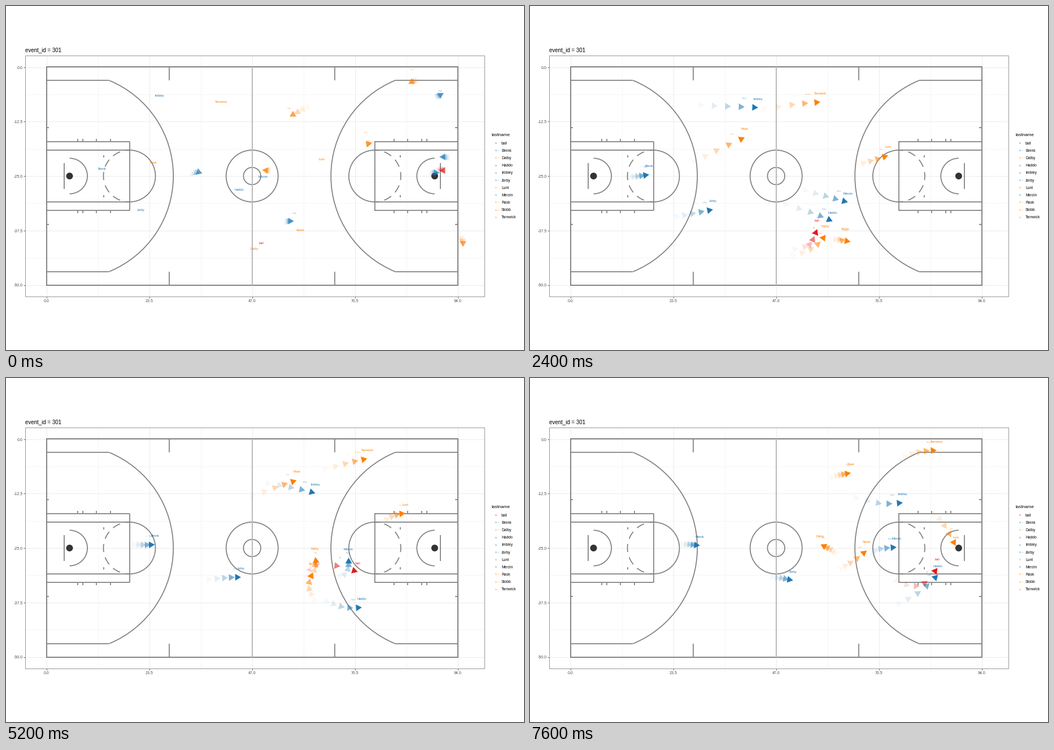
These frames come from a looping animation (917x611 px, 8 s). A matplotlib script:

```python
import numpy as np
import matplotlib.pyplot as plt
from matplotlib.animation import FuncAnimation
from matplotlib.patches import Arc, Circle, Polygon, Rectangle

W, H, DPI = 917, 611, 100
PX = 72 / DPI
FRAMES, INTERVAL = 20, 400
RED, BLUE, ORANGE = "#e31a1c", "#1f78b4", "#ff7f00"
GREY = "#7f7f7f"
WAKE_ALPHA = [1, 0.57, 0.3, 0.13, 0.04]
WAKE_SIZE = [1, 0.5, 0.25]
LABEL_RISE = 15
CX, CY = 435.7, 302

plt.rcParams["font.family"] = "Liberation Sans"
fig = plt.figure(figsize=(W / DPI, H / DPI), dpi=DPI, facecolor="white")
ax = fig.add_axes([0, 0, 1, 1])
ax.set_xlim(0, W)
ax.set_ylim(H, 0)
ax.axis("off")


def line(x0, y0, x1, y1, color=GREY, width=1.7, z=2):
    ax.plot([x0, x1], [y0, y1], color=color, lw=width * PX, zorder=z,
            solid_capstyle="butt")


def text(x, y, s, size, color="black", ha="center", va="center_baseline", **kw):
    return ax.text(x, y, s, fontsize=size * PX, color=color, ha=ha, va=va, **kw)


def arc(x, y, r, start, end):
    # Angles run clockwise on screen because y points down.
    ax.add_patch(Arc((x, y), 2 * r, 2 * r, theta1=start, theta2=end,
                     color=GREY, lw=1.7 * PX, zorder=2))


def draw_panel():
    xs = np.linspace(71.8, 799.6, 5)
    ys = np.linspace(108.5, 495.5, 5)
    for x in (xs[:-1] + xs[1:]) / 2:
        line(x, 88, x, 516, "#f0f0f0", 0.6, 0)
    for y in (ys[:-1] + ys[1:]) / 2:
        line(34, y, 847, y, "#f0f0f0", 0.6, 0)
    for i, x in enumerate(xs):
        line(x, 88, x, 516, "#ebebeb", 1, 0)
        line(x, 516, x, 519, "#555555", 0.9)
        text(x, 523.3, f"{23.5 * i:.1f}", 7, "#4d4d4d")
    for i, y in enumerate(ys):
        line(34, y, 847, y, "#ebebeb", 1, 0)
        line(31, y, 34, y, "#555555", 0.9)
        text(30, y + 0.5, f"{-12.5 * i if i else 0:.1f}", 7, "#4d4d4d", "right")
    ax.add_patch(Rectangle((34, 88), 813, 428, fill=False, ec="#8c8c8c",
                           lw=0.9 * PX, zorder=3))
    text(33.5, 81, "event_id = 301", 9.8, ha="left", va="baseline")


def draw_half(flip):
    def mx(x):
        return 2 * CX - x if flip else x

    def seg(x0, y0, x1, y1):
        line(mx(x0), y0, mx(x1), y1)

    def curve(x, r, start, end):
        if flip:
            start, end = 180 - end, 180 - start
        arc(mx(x), CY, r, start, end)

    for s in (-1, 1):
        seg(72, CY + s * 169.7, 182, CY + s * 169.7)
        seg(72, CY + s * 61.3, 219.3, CY + s * 61.3)
        seg(72, CY + s * 46, 218.5, CY + s * 46)
        seg(289.3, CY + s * 170, 289.3, CY + s * 194)
        seg(72, CY + s * 85.7, 76, CY + s * 85.7)
        seg(173, CY + s * 33.5, 173, CY + s * 37.5)
        for x in (126.7, 135.8, 160.3, 184.7):
            seg(x, CY + s * 62, x, CY + s * 66)
    seg(218.5, CY - 61.3, 218.5, CY + 61.3)
    seg(102.5, 278.7, 102.5, 325.2)
    curve(112.5, 183.7, -67.6, 67.6)
    curve(112.5, 31.6, -90, 90)
    curve(218.5, 46, -90, 90)
    for mid in range(120, 241, 30):
        curve(218.5, 46, mid - 9, mid + 9)
    curve(218.5, 46, 90, 99)
    curve(218.5, 46, 261, 270)
    ax.add_patch(Circle((mx(112.5), CY), 6, color="#333333", lw=0, zorder=2))


def draw_court():
    ax.add_patch(Rectangle((71.8, 108), 728, 388, fill=False, ec=GREY,
                           lw=1.9 * PX, zorder=2))
    draw_half(False)
    draw_half(True)
    arc(CX, CY, 46, 0, 360)
    arc(CX, CY, 15.3, 0, 360)
    line(CX, 108, CX, 496, "#bdbdbd", 2.2, 2.1)


class Runner:
    """A named marker that follows a smooth path through (step, x, y) keys."""

    def __init__(self, name, color, keys):
        self.name, self.color = name, color
        times, x, y = np.array(keys, float).T
        self.path = np.column_stack([self.smooth(times, x), self.smooth(times, y)])

    @staticmethod
    def smooth(times, values):
        slopes = np.gradient(values, times)
        t = np.arange(FRAMES)
        i = np.clip(np.searchsorted(times, t, "right") - 1, 0, len(times) - 2)
        h = times[i + 1] - times[i]
        u = (t - times[i]) / h
        return ((2 * u**3 - 3 * u**2 + 1) * values[i]
                + (u**3 - 2 * u**2 + u) * h * slopes[i]
                + (3 * u**2 - 2 * u**3) * values[i + 1]
                + (u**3 - u**2) * h * slopes[i + 1])

    def heading(self, step):
        dx, dy = self.path[step] - self.path[step - 1]
        return np.arctan2(-dy, dx)


RUNNERS = [
    Runner("ball", RED, [
        (0, 452, 421), (2, 475, 415), (3, 493, 410), (4, 499, 403), (6, 508, 381),
        (8, 527, 347), (9, 534, 331), (11, 556, 314), (12, 592, 319),
        (13, 623, 329), (15, 655, 348), (17, 690, 354), (18, 704, 345),
        (19, 721, 322)]),
    Runner("Brenk", BLUE, [
        (0, 170, 289), (4, 197, 286), (6, 211, 284), (8, 226, 281),
        (11, 249, 281), (15, 277, 280), (19, 301, 282)]),
    Runner("Dalby", ORANGE, [
        (0, 440, 431), (2, 472, 426), (4, 503, 413), (6, 523, 391), (8, 535, 361),
        (11, 547, 320), (13, 547, 303), (15, 536, 293), (19, 514, 281)]),
    Runner("Haddo", BLUE, [
        (0, 413, 326), (4, 503, 353), (6, 536, 367), (8, 561, 378),
        (11, 600, 392), (13, 630, 392), (15, 659, 382), (17, 692, 363),
        (19, 722, 334)]),
    Runner("Imbley", BLUE, [
        (0, 272, 159), (1, 289, 160), (4, 356, 163), (6, 404, 165), (8, 449, 170),
        (11, 511, 180), (15, 584, 199), (17, 623, 208), (19, 660, 206)]),
    Runner("Jorby", BLUE, [
        (0, 239, 362), (4, 294, 352), (6, 324, 346), (8, 352, 343),
        (11, 393, 339), (15, 436, 339), (19, 466, 344)]),
    Runner("Lunt", ORANGE, [
        (0, 559, 272), (4, 609, 258), (6, 634, 250), (8, 659, 242),
        (11, 689, 228), (13, 707, 225), (15, 722, 230), (17, 738, 253),
        (19, 754, 283)]),
    Runner("Merzin", BLUE, [
        (0, 455, 303), (4, 530, 324), (6, 563, 333), (8, 589, 336),
        (9, 597, 335), (10, 604, 329), (11, 606, 318), (13, 606, 304),
        (15, 610, 291), (17, 627, 287), (19, 649, 285)]),
    Runner("Rask", ORANGE, [
        (0, 261, 278), (4, 336, 238), (6, 380, 218), (8, 422, 200),
        (11, 482, 177), (15, 540, 159), (19, 568, 153)]),
    Runner("Stobb", ORANGE, [
        (0, 521, 398), (2, 539, 399), (4, 555, 400), (5, 559, 399), (6, 558, 396),
        (8, 548, 383), (10, 537, 363), (11, 535, 353), (13, 543, 330),
        (15, 556, 319), (17, 573, 309), (19, 596, 291)]),
    Runner("Tarnwick", ORANGE, [
        (0, 381, 170), (1, 399, 169), (4, 470, 159), (6, 514, 155), (8, 553, 149),
        (11, 607, 135), (15, 669, 121), (17, 695, 114.5), (19, 720, 113)]),
]

# Markers left by the preceding play: x, y, heading, wake step, colour, label.
LEFTOVERS = [
    (718, 135, 90, 3, -1, ORANGE, "Lunt"),
    (769, 158, -90, -2.5, 1, BLUE, "Haddo"),
    (508, 193, 210, 8.3, -4.5, ORANGE, "Stobb"),
    (641, 245, 130, 1, -1, ORANGE, "Rask"),
    (774, 268, 180, 3, 0.5, BLUE, ""),
    (774, 292, 180, -3, -1, RED, ""),
    (761, 296, 0, -3, 0.3, BLUE, ""),
    (341, 295, 100, -4, 1, BLUE, ""),
    (460, 292, 175, 2, 0, ORANGE, ""),
    (503, 382, 0, -2.5, 0.3, BLUE, "Jorby"),
    (809, 421, -90, -1.5, -4, ORANGE, ""),
]


def draw_legend():
    text(859.5, 231, "lastname", 8.2, ha="left", va="baseline")
    dotted = {"Brenk", "Dalby", "Jorby", "Rask", "Stobb"}
    for i, r in enumerate(RUNNERS):
        y = 243 + 13.17 * i
        text(866.7, y, "a", 4.6, r.color, alpha=0.85)
        if r.name in dotted:
            line(871, y, 872, y, r.color, 0.8)
        text(877, y + 0.2, r.name, 6.8, ha="left")


live = []


def marker(x, y, angle, color, alpha):
    corners = angle + np.radians([0, 120, 240])
    pts = np.column_stack([x + 6.9 * np.cos(corners), y - 6.9 * np.sin(corners)])
    live.append(ax.add_patch(Polygon(pts, fc=color, lw=0, alpha=alpha, zorder=4)))


def tag(x, y, name, color, age):
    if age < len(WAKE_SIZE):
        live.append(text(x, y, name, 5.6 * WAKE_SIZE[age], color,
                         alpha=WAKE_ALPHA[age], zorder=5))


def draw_leftovers(frame):
    for x, y, deg, dx, dy, color, name in LEFTOVERS:
        angle = np.radians(deg)
        for back in range(3, -1, -1):
            age = frame + back + 1
            if age < len(WAKE_ALPHA):
                alpha = 0.72 if age == 1 else WAKE_ALPHA[age]
                marker(x + back * dx, y + back * dy, angle, color, alpha)
        tag(x + 7 * np.cos(angle), y - LABEL_RISE - 7 * np.sin(angle),
            name, color, frame + 1)


def update(frame):
    while live:
        live.pop().remove()
    draw_leftovers(frame)
    for age in reversed(range(len(WAKE_ALPHA))):
        step = frame - age
        if step < 0:
            continue
        for r in RUNNERS:
            x, y = r.path[step]
            tag(x, y, r.name, r.color, age)
            if step:
                # The glyph is anchored by its tip and turns about that point.
                a = r.heading(step)
                marker(x - 7 * np.cos(a) + 0.5 * np.sin(a),
                       y + LABEL_RISE + 7 * np.sin(a) + 0.5 * np.cos(a),
                       a, r.color, WAKE_ALPHA[age])
    return live


draw_panel()
draw_court()
draw_legend()
anim = FuncAnimation(fig, update, frames=FRAMES, interval=INTERVAL,
                     init_func=lambda: live, repeat=True, repeat_delay=0,
                     blit=False)
plt.show()
```
